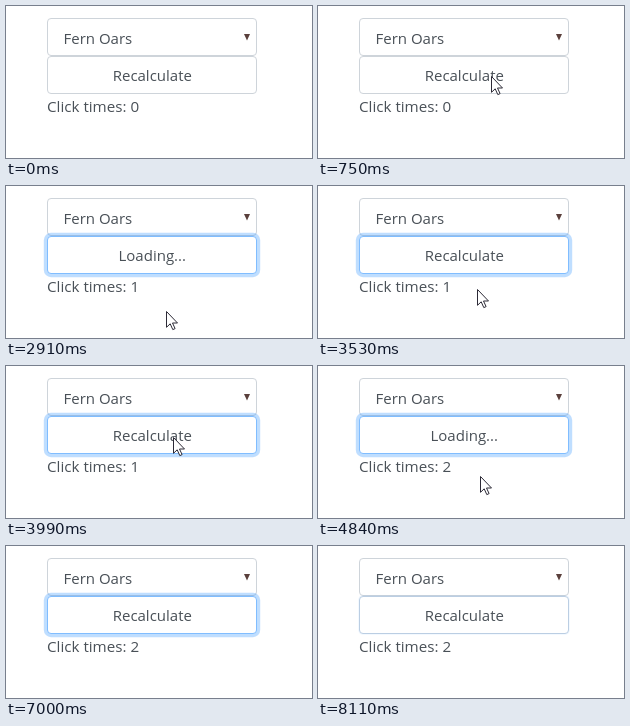
An HTML page that plays this animation: 306x152 px, repeating every 8.18 s.

```html
<!DOCTYPE html>
<html lang="en">
<head>
<meta charset="utf-8">
<title>Recalculate button</title>
<style>
  html, body { margin: 0; width: 100%; height: 100%; overflow: hidden; background: #fff; }
  svg { display: block; }
  text { font: 15px "Open Sans", "Noto Sans", sans-serif; fill: #495057; }
  #count { font-size: 15.2px; }
  .box { fill: #fff; stroke: #ced4da; }
</style>
</head>
<body>
<svg width="306" height="152" viewBox="0 0 306 152">
  <rect class="box" x="41.5" y="12.5" width="209" height="37" rx="3.5"/>
  <text x="57.5" y="38">Fern Oars</text>
  <path d="M238 28h6l-3 6.5z" fill="#5a403c"/>
  <rect id="glow" fill="#007bff"/>
  <rect id="button" class="box" x="41.5" y="50.5" width="209" height="37" rx="3.5"/>
  <text id="label" x="146.3" y="75" text-anchor="middle">Recalculate</text>
  <text id="count" x="41" y="106">Click times: 0</text>
  <path id="cursor" d="M.5 .5V16.3L4.2 12.8L6.8 18.6L9.1 17.6L6.5 12H11.5Z" fill="#fff" stroke="#2c2a36"/>
</svg>
<script>
const LOOP = 8180, TICK = 77, LOADING = 2000;
const FOCUS = 1230, BLUR = 8110;
const clicks = [1300, 4600];

// Pointer moves: start time, number of ticks, end point
const home = { x: 232, y: 160 };
const moves = [
  [130, 1, 257, 117],
  [210, 1, 261, 110],
  [440, 5, 173, 70],
  [1830, 5, 160, 129],
  [2910, 1, 160, 125],
  [3140, 6, 159, 103],
  [3600, 1, 165, 107],
  [3830, 3, 167, 71],
  [4680, 3, 162, 110],
  [5070, 3, 146, 99],
  [5530, 1, 146, 103],
  [6840, 3, home.x, home.y]
];

const el = id => document.getElementById(id);
const glow = el("glow"), button = el("button"), label = el("label");
const count = el("count"), cursor = el("cursor");

const mix = (a, b, k) => a + (b - a) * k;
const smooth = p => p * p * (3 - 2 * p);
const setText = (node, s) => { if (node.textContent !== s) node.textContent = s; };

// Progress from 0 to 1 in equal ticks, the first one at the start time
const ramp = (t, start, ticks) =>
  Math.max(0, Math.min(1, (Math.floor((t - start) / TICK) + 1) / ticks));

function pointerAt(t) {
  let { x, y } = home;
  for (const [start, ticks, toX, toY] of moves) {
    if (t < start) break;
    const p = ramp(t, start, ticks);
    x = mix(x, toX, smooth(p));
    y = mix(y, toY, p);
  }
  return [Math.round(x), Math.round(y)];
}

function setFocus(k) {
  const spread = 3.2 * k;
  const attrs = {
    x: 41 - spread, y: 50 - spread,
    width: 210 + 2 * spread, height: 38 + 2 * spread,
    rx: 4 + spread, "fill-opacity": .25 * k
  };
  for (const name in attrs) glow.setAttribute(name, attrs[name]);
  button.style.stroke = `rgb(${mix(206, 128, k)}, ${mix(212, 189, k)}, ${mix(218, 255, k)})`;
}

function draw() {
  const t = performance.now() % LOOP;
  cursor.setAttribute("transform", `translate(${pointerAt(t)})`);
  setFocus(t < BLUR ? ramp(t, FOCUS, 3) : .25);
  const loading = clicks.some(c => t >= c && t < c + LOADING);
  setText(label, loading ? "Loading..." : "Recalculate");
  setText(count, "Click times: " + clicks.filter(c => t >= c).length);
  requestAnimationFrame(draw);
}
draw();
</script>
</body>
</html>
```
